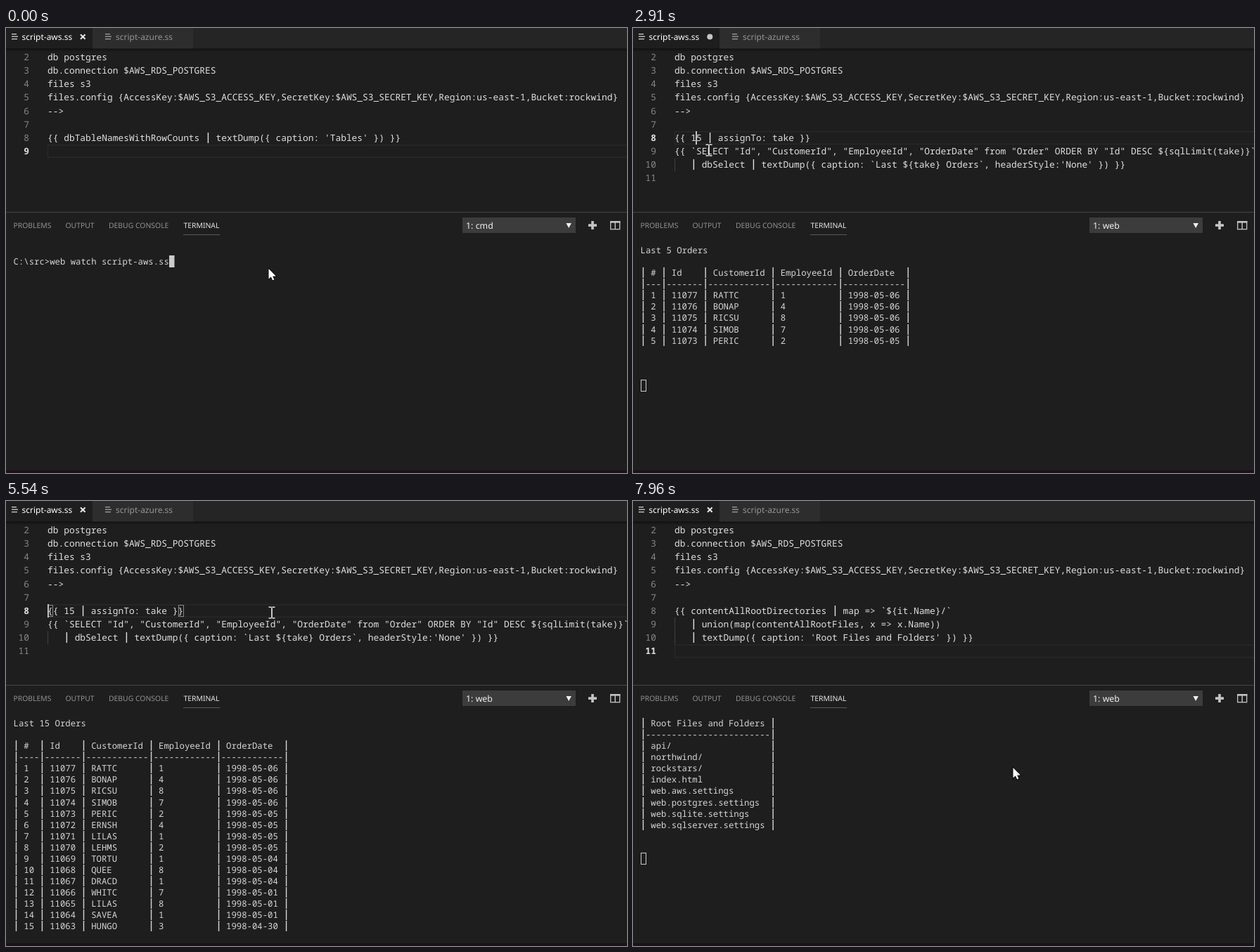
These frames come from a looping animation (883x634 px, 8 s). An HTML page with a canvas:

```html
<!DOCTYPE html>
<html lang="en">
<head>
<meta charset="utf-8">
<title>Live scripting in an editor</title>
<style>
html, body { margin: 0; width: 100%; height: 100%; overflow: hidden; background: #1e1e1e; }
canvas { display: block; }
</style>
</head>
<body>
<canvas id="stage" width="883" height="634"></canvas>
<script>
const W = 883, H = 634, LOOP = 8000, BLINK = 463;
const ctx = document.getElementById('stage').getContext('2d');

const MONO = '"Noto Sans Mono", "DejaVu Sans Mono", monospace';
const SANS = '"Noto Sans", "Open Sans", sans-serif';
const ED = { x: 59, adv: 7.733, pitch: 19.1, size: 12.89 };
const TERM = { x: 10.5, adv: 7.386, pitch: 16.08, size: 12.31 };

// Editor contents; the first entry is line 2
const head = [
  'db postgres',
  'db.connection $AWS_RDS_POSTGRES',
  'files s3',
  'files.config {AccessKey:$AWS_S3_ACCESS_KEY,SecretKey:$AWS_S3_SECRET_KEY,Region:us-east-1,Bucket:rockwind}',
  '-->',
  ''
];
const tablesDoc = [...head, "{{ dbTableNamesWithRowCounts | textDump({ caption: 'Tables' }) }}", ''];
const ordersDoc = n => [...head,
  `{{ ${n} | assignTo: take }}`,
  '{{ `SELECT "Id", "CustomerId", "EmployeeId", "OrderDate" from "Order" ORDER BY "Id" DESC ${sqlLimit(take)}`',
  "   | dbSelect | textDump({ caption: `Last ${take} Orders`, headerStyle:'None' }) }}",
  ''];
const filesDoc = [...head,
  '{{ contentAllRootDirectories | map => `${it.Name}/`',
  '   | union(map(contentAllRootFiles, x => x.Name))',
  "   | textDump({ caption: 'Root Files and Folders' }) }}",
  ''];

// Terminal tables
const tableRow = (cells, widths) => '|' + cells.map((c, i) => ` ${String(c).padEnd(widths[i])} |`).join('');
const rule = widths => '|' + widths.map(w => '-'.repeat(w + 2) + '|').join('');

function tablesOut() {
  const w = [18, 4];
  const names = ['Order Detail', 'Order', 'Customer', 'Product', 'Territory', 'Region',
    'Shipper', 'Supplier', 'Category', 'Employee', 'Employee Territory'];
  const counts = [2155, 830, 91, 77, 53];
  return ['| Tables'.padEnd(27) + '||', rule(w),
    ...names.map((n, i) => tableRow([n, counts[i] || 0], w))];
}

function ordersOut(n) {
  const w = [String(n).length, 5, 10, 10, 10];
  const who = 'RATTC BONAP RICSU SIMOB PERIC ERNSH LILAS LEHMS TORTU QUEE DRACD WHITC LILAS SAVEA HUNGO'.split(' ');
  const staff = '148724121817813';
  const day = i => i < 4 ? '05-06' : i < 8 ? '05-05' : i < 11 ? '05-04' : i < 14 ? '05-01' : '04-30';
  return [`Last ${n} Orders`, '',
    tableRow(['#', 'Id', 'CustomerId', 'EmployeeId', 'OrderDate'], w), rule(w),
    ...who.slice(0, n).map((c, i) => tableRow([i + 1, 11077 - i, c, staff[i], '1998-' + day(i)], w))];
}

function filesOut() {
  const w = [22];
  const files = ['api/', 'northwind/', 'rockstars/', 'index.html', 'web.aws.settings',
    'web.postgres.settings', 'web.sqlite.settings', 'web.sqlserver.settings'];
  return [tableRow(['Root Files and Folders'], w), rule(w), ...files.map(f => tableRow([f], w))];
}

// Timeline: each entry patches the state; a caret entry restarts the blink.
// caret: [line, col], sel: [first line, last line, last col], cur: [row, col]
const prompt = ['', 'C:\\src>web watch script-aws.ss'];
const END = Infinity;
const cleared = { out: [], cur: [0, 0] };
const events = [
  [0, { doc: tablesDoc, caret: [9, 0], sel: null, pair: false, dirty: false, focus: false,
        shell: '1: cmd', out: prompt, cur: [1, 30] }],
  [80, { cur: [2, 0] }],
  [170, { shell: '1: web' }],
  [410, cleared],
  [470, { out: ['', "Watching 'script-aws.ss' (Ctrl+C to stop):"], cur: [3, 0] }],
  [880, { out: tablesOut(), cur: [15, 0] }],
  [950, { focus: true, caret: [9, 0] }],
  [1030, { caret: [8, 0], sel: [8, 9, 0] }],
  [1430, { doc: ordersDoc(5), caret: [11, 0], sel: null, dirty: true }],
  [1880, { dirty: false }],
  [1970, cleared],
  [2110, { out: ordersOut(5), cur: [12, 0] }],
  [2750, { caret: [8, 3] }],
  [2910, { doc: ordersDoc(15), caret: [8, 4], dirty: true }],
  [2980, { dirty: false, caret: [8, 4] }],
  [3060, cleared],
  [3220, { out: ordersOut(15), cur: null }],
  [4760, { caret: [8, END], pair: true }],
  [5390, { caret: [8, 0] }],
  [5460, { caret: [7, 0], pair: false }],
  [5540, { caret: [8, 0], pair: true }],
  [5710, { caret: [9, 0], sel: [8, 9, 0], pair: false }],
  [5790, { caret: [10, 0], sel: [8, 10, 0] }],
  [5860, { caret: [10, END], sel: [8, 10, END] }],
  [6030, { caret: [11, 0], sel: [8, 11, 0] }],
  [6110, { caret: [11, 0] }],
  [6570, { doc: filesDoc, caret: [11, 0], sel: null, dirty: true }],
  [6880, { dirty: false, ...cleared }],
  [7650, { out: filesOut(), cur: [12, 0] }]
];

// Pointer stops: time, x, y
const pointer = [
  [0, 373, 343], [80, 440, 313], [170, 508, 283], [950, 687, 203],
  [2190, 640, 200], [2270, 520, 190], [2350, 380, 178], [2430, 250, 165],
  [2510, 160, 158], [2590, 110, 156], [2670, 90, 156], [2830, 100, 166], [2910, 108, 174],
  [3060, 130, 250], [3140, 180, 360], [3220, 240, 450], [3300, 285, 510], [3380, 300, 534],
  [4210, 420, 470], [4290, 620, 360], [4370, 720, 273], [4450, 640, 220],
  [4530, 480, 172], [4610, 383, 158], [4840, 378, 159],
  [7730, 620, 200], [7810, 838, 300], [7880, 700, 360], [7960, 540, 380]
];

function stateAt(t) {
  const s = {};
  for (const [at, patch] of events) {
    if (at > t) break;
    Object.assign(s, patch);
    if (patch.caret) s.beat = at;
  }
  s.caretOn = s.focus && Math.floor((t - s.beat) / BLINK) % 2 === 0;
  return s;
}

// Drawing helpers
function box(x, y, w, h, color) {
  ctx.fillStyle = color;
  ctx.fillRect(x, y, w, h);
}

function label(text, x, y, size, color) {
  ctx.font = `${size}px ${SANS}`;
  ctx.fillStyle = color;
  ctx.fillText(text, x, y);
}

// Column bars are drawn tall, the rest is plain text
function mono(text, grid, y, color) {
  ctx.font = `500 ${grid.size}px ${MONO}`;
  ctx.fillStyle = color;
  ctx.fillText(text.replace(/\|/g, ' '), grid.x, y);
  [...text].forEach((c, i) => {
    if (c === '|') ctx.fillRect(grid.x + (i + 0.5) * grid.adv - 0.4, y - 12, 1.4, 15);
  });
}

function poly(points, fill, stroke) {
  ctx.beginPath();
  points.forEach(([x, y]) => ctx.lineTo(x, y));
  ctx.closePath();
  if (stroke) {
    ctx.strokeStyle = stroke;
    ctx.lineWidth = 1.4;
    ctx.stroke();
  }
  ctx.fillStyle = fill;
  ctx.fill();
}

const lineTop = n => 147 + (n - 8) * ED.pitch;
const colX = c => ED.x + c * ED.adv;

function fileIcon(x, color) {
  [7, 9, 8].forEach((w, i) => box(x, 8 + i * 3.5, w, 1.3, color));
}

function drawTabs(s) {
  box(0, 0, W, 30, '#252526');
  box(0, 0, 123, 30, '#1e1e1e');
  box(123, 0, 143, 30, '#2d2d2d');
  const shade = ctx.createLinearGradient(0, 29, 0, 34);
  shade.addColorStop(0, 'rgba(0,0,0,.45)');
  shade.addColorStop(1, 'rgba(0,0,0,0)');
  box(0, 29, W, 5, shade);
  fileIcon(8, '#d0d0d0');
  label('script-aws.ss', 22.5, 17, 12, '#ffffff');
  fileIcon(141, '#a0a0a0');
  label('script-azure.ss', 156, 17, 12, '#949494');
  if (s.dirty) {
    ctx.fillStyle = '#c5c5c5';
    ctx.beginPath();
    ctx.arc(109.3, 12.5, 4, 0, 7);
    ctx.fill();
  } else {
    ctx.strokeStyle = '#e8e8e8';
    ctx.lineWidth = 2;
    ctx.beginPath();
    for (const d of [-3.3, 3.3]) {
      ctx.moveTo(109.3 - d, 9.2);
      ctx.lineTo(109.3 + d, 15.8);
    }
    ctx.stroke();
  }
}

function drawSelection(s) {
  const [first, last, endCol] = s.sel;
  ctx.fillStyle = '#264f78';
  for (let n = first; n <= last; n++) {
    const len = s.doc[n - 2].length;
    const end = n < last ? len + 1 : Math.min(endCol, len);
    if (!end) continue;
    ctx.beginPath();
    ctx.roundRect(ED.x, lineTop(n), end * ED.adv, ED.pitch, last - first > 1 ? 0 : 3);
    ctx.fill();
  }
}

function drawEditor(s) {
  const [line, col] = s.caret;
  const lineLen = s.doc[line - 2].length;
  if (s.sel) drawSelection(s);
  else {
    ctx.lineWidth = 1.4;
    ctx.strokeStyle = '#292929';
    ctx.strokeRect(59.5, lineTop(line) + 0.8, W, ED.pitch - 1.6);
  }
  if (s.pair) {
    ctx.lineWidth = 1;
    ctx.strokeStyle = '#888888';
    for (const c of [0, s.doc[6].length - 1])
      ctx.strokeRect(Math.round(colX(c)) + 0.5, 148.5, 7, 16);
  }
  s.doc.forEach((text, i) => {
    const n = i + 2, y = Math.round(lineTop(n) + 13.8);
    if (text.startsWith(' ')) box(59, lineTop(n), 1, ED.pitch, '#404040');
    mono(text, ED, y, '#e0e0e0');
    ctx.font = `${n === line ? '600 ' : ''}${ED.size}px ${MONO}`;
    ctx.fillStyle = n === line ? '#dddddd' : '#858585';
    ctx.textAlign = 'right';
    ctx.fillText(n, 33, y);
    ctx.textAlign = 'left';
  });
  if (s.caretOn)
    box(Math.floor(colX(Math.min(col, lineLen))), lineTop(line), 2, ED.pitch, '#c0c1bf');
}

function drawPanel(s) {
  box(0, 262, W, 1, '#454545');
  const idle = '#919191';
  label('PROBLEMS', 10.5, 285, 10.4, idle);
  label('OUTPUT', 84.5, 285, 10.4, idle);
  label('DEBUG CONSOLE', 146, 285, 10.4, idle);
  label('TERMINAL', 252.5, 285, 10.4, '#e7e7e7');
  box(252, 294, 52, 1, '#5a5a5a');

  box(649, 270, 161, 22, '#3c3c3c');
  label(s.shell, 654, 286, 12.4, '#f0f0f0');
  poly([[796.5, 278], [804, 278], [800.2, 285]], '#f0f0f0');
  box(828, 279.3, 12, 3.6, '#c5c5c5');
  box(832.2, 275, 3.6, 12, '#c5c5c5');
  ctx.strokeStyle = '#c5c5c5';
  ctx.lineWidth = 1.3;
  ctx.strokeRect(859.7, 275.7, 13, 11);
  box(859, 275, 14.4, 2.6, '#c5c5c5');
  box(865.5, 276, 1.4, 11, '#c5c5c5');

  s.out.forEach((text, i) => mono(text, TERM, Math.round(321 + i * TERM.pitch), '#d6d6d6'));
  if (s.cur) {
    const x = Math.round(TERM.x + s.cur[1] * TERM.adv), y = Math.round(308.3 + s.cur[0] * TERM.pitch);
    if (s.focus) {
      ctx.strokeStyle = '#cccccc';
      ctx.lineWidth = 1;
      ctx.strokeRect(x + 0.5, y + 0.5, 7, 16);
    } else box(x, y, 7.5, 17, '#cccccc');
  }
  box(0, 630, W, 4, '#1d1119');
}

// Pointer shapes
function arrow() {
  poly([[0.5, 0], [0.5, 14.5], [3.8, 11.6], [6.2, 16.6], [8.4, 15.6], [6.2, 10.8], [10.8, 10.6]],
    '#ffffff', '#000000');
}

function beam() {
  box(-0.8, -7.5, 1.6, 15, '#f0f0f0');
  for (const y of [-8.5, 7.2]) {
    box(-4.5, y, 4, 1.4, '#f0f0f0');
    box(0.5, y, 4, 1.4, '#f0f0f0');
  }
}

function hand() {
  poly([[-0.8, 0.8], [0.6, 0], [2, 0.8], [2, 6], [4.6, 6.2], [7, 7], [9, 8], [9.6, 9.4], [9.4, 14],
    [8, 16.5], [8, 19.5], [0, 19.5], [-1, 17], [-5, 12], [-4.4, 10.3], [-2.6, 10.6], [-0.8, 12.4]],
    '#ffffff', '#000000');
}

function drawPointer(t) {
  const [, x, y] = pointer.filter(p => p[0] <= t).pop();
  const onSelect = x > 649 && x < 810 && y > 270 && y < 292;
  ctx.save();
  ctx.translate(x, y);
  (y < 262 ? beam : onSelect ? hand : arrow)();
  ctx.restore();
}

function draw(now) {
  const t = now % LOOP, s = stateAt(t);
  ctx.textRendering = 'geometricPrecision';
  box(0, 0, W, H, '#1e1e1e');
  drawEditor(s);
  drawTabs(s);
  drawPanel(s);
  drawPointer(t);
}

const start = performance.now();
function tick() {
  draw(performance.now() - start);
  requestAnimationFrame(tick);
}
tick();
</script>
</body>
</html>
```
